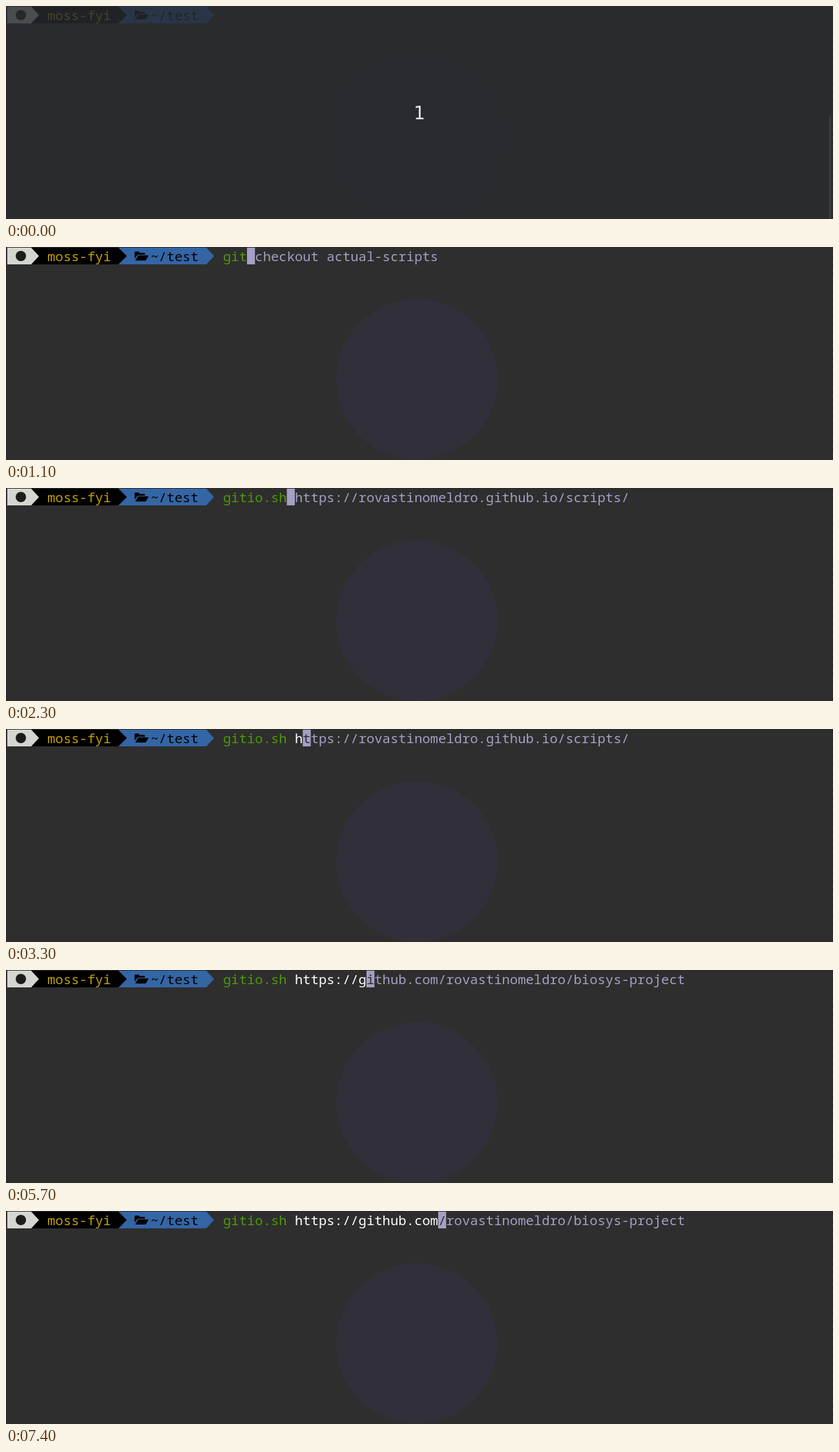
An HTML page that plays this animation: 1280x331 px, repeating every 8000 ms.

```html
<!DOCTYPE html>
<html lang="en">
<head>
<meta charset="utf-8">
<title>Terminal</title>
<style>
  html, body { margin: 0; width: 100%; height: 100%; overflow: hidden; background: #2e2e2e; }
  svg { display: block; width: 100%; height: 100%; }
  text { font: 20.55px "Noto Sans Mono", monospace; white-space: pre; }
  .bad { fill: #ef2929; font-weight: 700; }
  .good { fill: #4e9a06; }
  .args { fill: #fff; }
  .hint { fill: #a3a0c4; }
  .under { fill: #2e2e2e; }
  #count { font: 28px "DejaVu Sans", sans-serif; fill: #e8e8e8; text-anchor: middle; }
</style>
</head>
<body>
<svg viewBox="0 0 1280 331">
  <rect width="1280" height="331" fill="#2e2e2e"/>
  <circle cx="636" cy="206" r="125" fill="#312f39"/>
  <path d="M0 .5H1280M.5 0V331" stroke="#292929"/>
  <path d="M1279 0V331" stroke="#272727" stroke-width="2" stroke-dasharray="7 6"/>

  <path d="M174 1H310L322 14L310 27H174Z" fill="#3465a4"/>
  <path d="M39 1H174L187 14L174 27H39Z" fill="#000"/>
  <path d="M2 1H39L51 14L39 27H2Z" fill="#d3d7cf"/>
  <circle cx="23" cy="14" r="8" fill="#1c1c1c"/>
  <path d="M199 18V8.5Q199 7 200.500 7H205L207 9H213.500Q215 9 215 10.500V12H205Q203.500 12 202.700 13.300ZM200 21L204 14Q204.600 13 206 13H219.500Q221 13 220.200 14.300L217 20Q216.400 21 215 21Z"/>
  <text x="64" y="21.500" fill="#c4a000">moss-fyi</text>
  <text x="224" y="21.500">~/test</text>

  <rect id="cursor" y="1" width="12.330" height="26"/>
  <text id="line" x="336" y="21.500"><tspan id="command"></tspan><tspan id="args" class="args"></tspan><tspan id="under" class="under"></tspan><tspan id="hint" class="hint"></tspan></text>

  <g id="countdown">
    <rect width="1277" height="331" fill="#282b30" fill-opacity=".8"/>
    <rect x="1274" y="170" width="3" height="161" fill="#3a3c40"/>
    <text id="count" x="640" y="176">1</text>
  </g>
</svg>
<script>
const LOOP = 8000, LEFT = 336, CELL = 12.33;
const user = "rovastinomeldro";
const checkout = "git checkout actual-scripts";
const pages = `gitio.sh https://${user}.github.io/scripts/`;
const repo = `gitio.sh https://github.com/${user}/biosys-project`;

// Each entry: start in ms, suggested line, typed length
const steps = [
  [0, "", 0], [500, checkout, 1], [700, checkout, 2], [1100, checkout, 3],
  [1200, pages, 4], [1400, pages, 5], [2000, pages, 6], [2200, pages, 7],
  [2300, pages, 8], [2800, pages, 9], [3300, pages, 10], [3700, pages, 11],
  [3800, pages, 13], [3900, pages, 14], [4900, pages, 16], [5300, pages, 17],
  [5700, repo, 18], [5900, repo, 19], [6200, repo, 20], [6300, repo, 21],
  [6400, repo, 22], [6700, repo, 23], [7300, repo, 25], [7400, repo, 27]
];
const commands = ["git", "gitio.sh"];
const el = id => document.getElementById(id);
const [cursor, command, args, under, hint, countdown] =
  ["cursor", "command", "args", "under", "hint", "countdown"].map(el);

function draw(time) {
  const [, line, length] = steps.findLast(step => step[0] <= time);
  const typed = line.slice(0, length);
  const word = typed.split(" ")[0];
  const visible = time >= 200 && !(time >= 1900 && time < 2000);

  command.textContent = word;
  command.setAttribute("class", commands.includes(word) ? "good" : "bad");
  args.textContent = typed.slice(word.length);
  under.textContent = line.charAt(length);
  under.setAttribute("class", visible ? "under" : "hint");
  hint.textContent = line.slice(length + 1);

  cursor.setAttribute("x", LEFT + length * CELL);
  cursor.setAttribute("fill", line ? "#a3a0c4" : "#fff");
  cursor.style.display = visible ? "" : "none";
  countdown.style.display = time < 200 ? "" : "none";
}

const start = performance.now();
function tick() {
  draw((performance.now() - start) % LOOP);
  requestAnimationFrame(tick);
}
tick();
</script>
</body>
</html>
```
